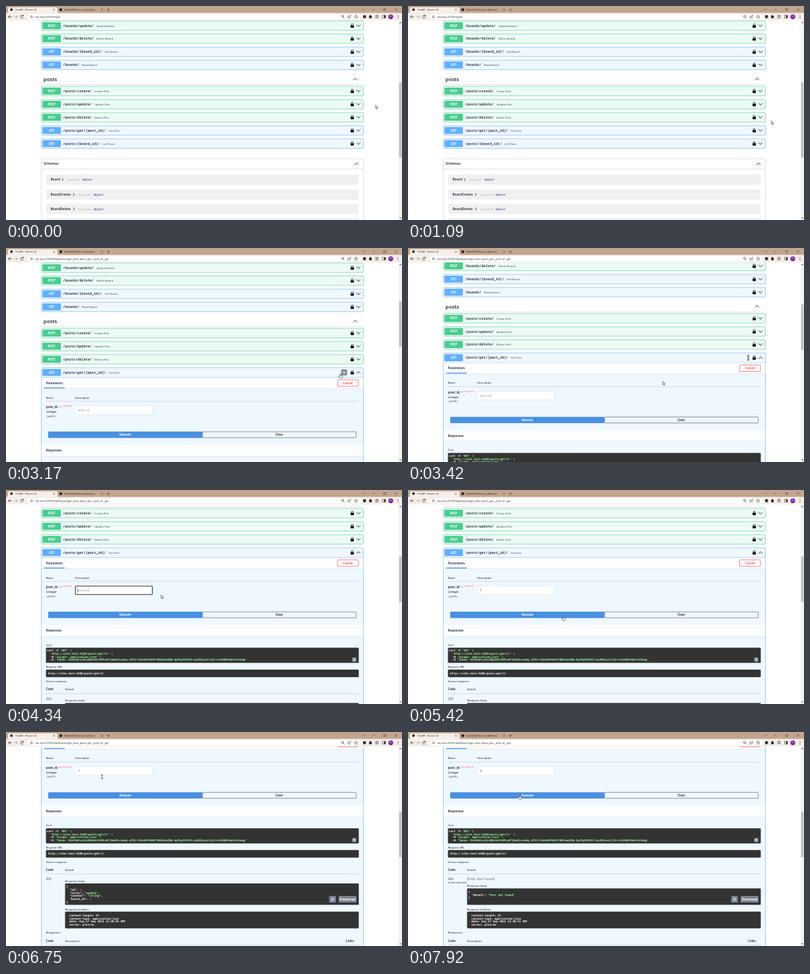
Write an HTML page that moves like this. It is 600 by 325 pixels and loops after 8 s.

```html
<!DOCTYPE html>
<html lang="en">
<head>
<meta charset="utf-8">
<title>API docs</title>
<style>
html, body { margin: 0; width: 100%; height: 100%; overflow: hidden; background: #fff; }
svg { display: block; width: 100vw; height: 100vh; }
text { font-family: "Open Sans", "Noto Sans", sans-serif; fill: #3b4151; white-space: pre; }
.b { font-weight: 700; }
.s { font-weight: 600; }
.path { font-family: "Noto Sans Mono", monospace; font-weight: 600; }
.code { font-family: "DejaVu Sans Mono", monospace; font-weight: 700; }
.line { fill: none; stroke-linecap: round; stroke-linejoin: round; }
</style>
</head>
<body>
<svg id="stage" viewBox="0 0 600 325"></svg>
<script>
const LOOP = 8000;
const GREEN = '#49cc90', BLUE = '#61affe', INK = '#3b4151', DARK = '#333', SLATE = '#7d8293';
const HOST = 'site.test:4100';

// Drawing helpers; text is placed by its vertical centre
const text = (x, cy, size, str, attrs = '') =>
  `<text x="${x}" y="${cy + size * 0.35}" font-size="${size}" ${attrs}>${str}</text>`;
const rect = (x, y, w, h, fill, attrs = '') =>
  `<rect x="${x}" y="${y}" width="${w}" height="${h}" fill="${fill}" ${attrs}/>`;
const path = (d, stroke = INK, w = 0.8, attrs = '') =>
  `<path class="line" d="${d}" stroke="${stroke}" stroke-width="${w}" ${attrs}/>`;
const rule = (x, y, w) => rect(x, y, w, 0.4, INK, 'opacity=".35"');
const group = (id, body) => `<g id="${id}">${body}</g>`;
const tint = (str, color) => `<tspan fill="${color}">${str}</tspan>`;
const str = s => tint(s, '#a2fca2');
const num = s => tint(s, '#d36363');
const mid = 'text-anchor="middle"';

const chevron = (x, y, up) => {
  const d = up ? -1.4 : 1.4;
  return path(`M${x - 2.7} ${y - d}L${x} ${y + d}L${x + 2.7} ${y - d}`, '#222', 0.9);
};
const lock = (x, y) =>
  rect(x - 2.5, y - 0.7, 5, 3.7, '#111', 'rx=".6"') +
  path(`M${x - 1.5} ${y - 0.5}v-1a1.5 1.5 0 0 1 3 0v1`, '#111', 0.8);
const copyIcon = (x, y, w, h) =>
  rect(x - w / 2, y - h / 2, w, h, SLATE, 'rx="1.2"') +
  rect(x - 1.5, y - 1.6, 3, 3.5, 'none', 'stroke="#fff" stroke-width=".55"') +
  path(`M${x - 0.7} ${y - 0.4}h1.4M${x - 0.7} ${y + 0.7}h1.4`, '#fff', 0.4);

const summary = (cy, method, url, label) => {
  const color = method === 'GET' ? BLUE : GREEN;
  return rect(55.2, cy - 5.3, 28, 10.6, color, 'rx="1.1"') +
    text(69.2, cy, 4.5, method, `class="b" style="fill:#fff" ${mid}`) +
    text(86.3, cy, 5.2, url, 'class="path"') +
    text(90.1 + url.length * 3.12, cy + 0.4, 4.2, label) + lock(524.6, cy);
};
const frame = (y, h, color) =>
  rect(53.5, y, 488, h, color, `fill-opacity=".1" stroke="${color}" stroke-width=".6" rx="1.4"`);
const row = (cy, method, url, label) =>
  frame(cy - 7.2, 14.4, method === 'GET' ? BLUE : GREEN) +
  summary(cy, method, url, label) + chevron(534, cy);

const codeLines = (x, y, lines) =>
  lines.map((s, i) => text(x, y + i * 4.68, 4.17, s, 'class="code" style="fill:#fff"')).join('');
const darkBox = (x, y, h) => rect(x, y, 534.5 - x, h, DARK, 'rx="1.4"');

function makeToken(n) {
  const set = 'ABCDEFGHIJKLMNOPQRSTUVWXYZabcdefghijklmnopqrstuvwxyz0123456789';
  let seed = 77, out = '';
  while (out.length < n) {
    seed = (seed * 16807) % 2147483647;
    out += out.length === 36 || out.length === 63 ? '.' : set[seed % set.length];
  }
  return out;
}
const token = makeToken(107);

function request(id) {
  const url = `http://${HOST}/posts/get/${id}/`;
  return codeLines(62, 338, [
    `curl -X ${str("'GET'")} \\`,
    `  ${str(`'${url}'`)} \\`,
    `  -H ${str("'accept: application/json'")} \\`,
    `  -H ${str(`'Token: ${token}'`)}`
  ]) + codeLines(64, 372.3, [url]);
}

function response(ok) {
  const top = ok ? 417.5 : 425;
  const body = ok
    ? ['{', `  "id": ${num('1')},`, `  "title": ${str('"update"')},`,
       `  "content": ${str('"string"')},`, `  "board_id": ${num('1')}`, '}']
    : ['{', `  "detail": ${str('"Post not found"')}`, '}'];
  const extra = ok ? '' :
    text(89.5, 411, 5.3, 'Error: Not Found', 'opacity=".8"') +
    text(60.5, 416.5, 3.9, 'Undocumented', 'class="path" font-style="italic" style="font-weight:400"');
  return extra + text(60.5, 411, 4.8, ok ? '200' : '404') +
    text(89.5, top - 4, 4.1, 'Response body', 'class="s"') +
    darkBox(89.5, top, 450 - top) + codeLines(91.5, top + 4.9, body) +
    copyIcon(494.8, 441.5, 10.2, 10) +
    rect(504, 436.5, 27, 10, SLATE, 'rx="1.2"') +
    text(517.5, 441.5, 4.7, 'Download', `class="b" style="fill:#fff" ${mid}`) +
    codeLines(93.5, 465.8, [
      ` content-length: ${ok ? 57 : 27}`, ' content-type: application/json',
      ` date: Sun,17 Sep 2023 12:36:${ok ? 49 : 51} GMT`, ' server: plovrun']);
}

function model(cy, name, x) {
  return rect(61, cy - 7.6, 473, 15.3, '#f0f0f0', 'rx="1.2"') +
    text(67.5, cy, 4.9, name, 'class="b"') +
    path(`M${x - 0.9} ${cy - 1.6}l1.7 1.7l-1.7 1.7`, '#222', 0.9) +
    text(x + 7, cy + 0.3, 3.8, 'Expand all', 'style="fill:#aaa"') +
    text(x + 29.5, cy + 0.3, 4.2, 'object', 'class="code" style="fill:#6b4a9e"');
}

const closed =
  row(189, 'GET', '/posts/get/{post_id}/', 'Get Post') +
  row(209, 'GET', '/posts/{board_id}/', 'List Posts') +
  rect(53.5, 232, 488, 140, 'none', `stroke="${INK}" stroke-opacity=".35" stroke-width=".5" rx="1.4"`) +
  text(57, 239.5, 5.2, 'Schemas', 'class="b"') + chevron(531, 239.5, true) + rule(53.5, 247, 488) +
  model(263.5, 'Board', 86) + model(286.3, 'BoardCreate', 103) +
  model(308, 'BoardDelete', 103) + model(329.7, 'BoardUpdate', 103);

const opened =
  frame(181.8, 420, BLUE) + summary(189, 'GET', '/posts/get/{post_id}/', 'Get Post') +
  chevron(534, 189, true) + rect(53.5, 196.3, 488, 0.5, BLUE) +
  rect(53.8, 196.8, 487.4, 16.4, '#fff', 'opacity=".8"') +
  rect(53.8, 213.2, 487.4, 0.5, '#000', 'opacity=".12"') +
  text(60.5, 205.2, 4.4, 'Parameters', 'class="b"') + rect(58, 211.8, 31, 1.3, '#4990e2') +
  rect(502.4, 200, 31.6, 10, 'none', 'rx="1.2" stroke="#ff6060" stroke-width=".8"') +
  text(518.2, 205, 4.4, 'Cancel', `class="b" style="fill:#ff6060" ${mid}`) +
  text(60.5, 227.3, 3.9, 'Name', 'class="s"') + text(105, 227.3, 3.9, 'Description', 'class="s"') +
  rule(60.5, 232.7, 474) +
  text(60.5, 241.5, 5, 'post_id', 'class="b"') +
  text(81, 242, 5, '*', 'style="fill:#f33"') + text(85.5, 240.3, 3.3, 'required', 'style="fill:#f55"') +
  text(60.8, 248.9, 3.9, 'integer', 'class="code"') +
  text(60.8, 255.3, 4.1, '(path)', 'class="path" font-style="italic" style="font-weight:400"') +
  rect(105.2, 240, 116.6, 12.8, '#fff', 'id="field" rx="1.2"') +
  text(109, 246.6, 5.1, '', 'id="value"') + rect(108.5, 243.5, 0.5, 6.2, '#111', 'id="caret"') +
  rect(64, 278.8, 233.6, 9.6, '#4990e2', 'rx="1"') +
  rect(297.9, 279.1, 232.8, 9, 'none', 'stroke="#666" stroke-width=".7" rx="1"') +
  text(180.8, 283.6, 4.5, 'Execute', `class="b" style="fill:#fff" ${mid}`) +
  text(414, 283.6, 4.5, 'Clear', `class="b" ${mid}`) +
  rect(53.8, 299, 487.4, 17, '#fff', 'opacity=".8"') +
  rect(53.8, 316, 487.4, 0.5, '#000', 'opacity=".12"') +
  text(60.5, 307.4, 4.5, 'Responses', 'class="b"') +
  text(60.5, 329.3, 4.1, 'Curl', 'class="s"') + darkBox(60.5, 333.6, 23) +
  copyIcon(527.6, 351.5, 6.2, 6.4) +
  text(60.5, 362.8, 4.1, 'Request URL', 'class="s"') + darkBox(60.5, 366.7, 11.5) +
  [5, 1, 2].map(id => group('req' + id, request(id))).join('') +
  text(60.5, 384.6, 4.1, 'Server response', 'class="s"') +
  text(60.5, 396.6, 4.6, 'Code', 'class="b"') + text(89.5, 396.6, 4, 'Details', 'class="s"') +
  rule(60.5, 403, 474) +
  text(89.5, 456.5, 4.1, 'Response headers', 'class="s"') + darkBox(89.5, 460.2, 25.4) +
  group('good', response(true)) + group('bad', response(false)) +
  text(60.5, 492, 4.3, 'Responses', 'class="s"') +
  text(60.5, 504.6, 4.6, 'Code', 'class="b"') + text(89.5, 504.6, 4, 'Description', 'class="s"') +
  text(515, 504.6, 4.5, 'Links', 'class="b"') + rule(60.5, 510.5, 474);

const page =
  row(30, 'POST', '/boards/update/', 'Update Board') +
  row(49.6, 'POST', '/boards/delete/', 'Delete Board') +
  row(69.6, 'GET', '/boards/{board_id}/', 'Get Board') +
  row(89.5, 'GET', '/boards/', 'Read Board') +
  text(56.8, 111.2, 7.7, 'posts', 'class="b"') + chevron(529, 111, true) + rule(53.5, 119.3, 488) +
  row(129.2, 'POST', '/posts/create/', 'Create Post') +
  row(149.2, 'POST', '/posts/update/', 'Update Post') +
  row(169, 'POST', '/posts/delete/', 'Delete Post') +
  group('closed', closed) + group('opened', opened) +
  group('copy', copyIcon(0, 189, 8.8, 9));

const icon = (d, w = 0.7) => path(d, '#2a2a2a', w);
const chrome =
  rect(0, 0, 600, 11, '#c1a58f') + rect(0, 10.5, 600, 11.5, '#f6eee8') +
  '<path d="M1 11q2 0 2-2V4q0-2 2-2h71q2 0 2 2v5q0 2 2 2z" fill="#f6eee8"/>' +
  '<circle cx="8.3" cy="5.6" r="2" fill="#222"/><circle cx="83" cy="5.6" r="2.2" fill="#222"/>' +
  text(14, 5.6, 3.6, 'TirnAPI - Plovern UI', 'style="fill:#222"') +
  '<clipPath id="tab"><path d="M88 0h50v11h-50z"/></clipPath>' +
  text(88, 5.6, 3.6, 'NoraVell4/Exercise_Archives', 'clip-path="url(#tab)" style="fill:#222"') +
  icon('M71.3 4.4l2.4 2.4m0-2.4l-2.4 2.4M144.3 4.4l2.4 2.4m0-2.4l-2.4 2.4M153.4 5.6h3.6m-1.8-1.8v3.6', 0.5) +
  icon('M540 4.6l1.5 1.5l1.5-1.5M555.5 5.4h3M572.6 4h2.8v2.8h-2.8zM589.6 4l2.8 2.8m0-2.8l-2.8 2.8', 0.5) +
  rect(33, 12.2, 505, 8.2, '#fff', 'rx="4.1"') +
  icon('M8.4 16.3h-4.6m2-2l-2 2l2 2') +
  path('M12.8 16.3h4.6m-2-2l2 2l-2 2', '#a59b95', 0.7) +
  icon('M26 15a2.2 2.2 0 1 0 .2 2.4M26.3 13.7v1.6h-1.6') +
  icon('M40.2 16.3a1.7 1.7 0 1 0-3.4 0a1.7 1.7 0 1 0 3.4 0M38.5 16.2v.9', 0.45) +
  text(44, 16.3, 4, '', 'id="url" style="fill:#222"') +
  icon('M511.6 15.7a1.6 1.6 0 1 0-3.2 0a1.6 1.6 0 1 0 3.2 0M511.2 17l1.5 1.5', 0.6) +
  icon('M519.2 15.2h-1.4v3h4v-1.4M519.6 16.8q.2-2 2.6-2.2m-1-1.1l1.1 1.1l-1.1 1.1', 0.5) +
  icon('M530.5 13.8l.8 1.7l1.8.2l-1.3 1.2l.3 1.8l-1.6-.9l-1.6.9l.3-1.8l-1.3-1.2l1.8-.2z', 0.5) +
  rect(541, 14, 4.4, 4.6, '#333', 'rx="1"') +
  rect(550.2, 15, 4, 3.6, '#222', 'rx=".5"') + '<circle cx="552" cy="14.6" r="1" fill="#222"/>' +
  icon('M560 14.4h4M560 16.2h2.4M560 18h2.4M564 15.8v2.2') +
  icon('M571 14.2h4v4h-4z', 0.6) + rect(573, 14.2, 2, 4, '#222') +
  '<circle cx="583" cy="16.3" r="3.6" fill="#7b1fa2"/>' +
  text(583, 16.3, 3, 'HS', `style="fill:#fff" ${mid}`) +
  [14.3, 16.3, 18.3].map(y => `<circle cx="594" cy="${y}" r=".55" fill="#222"/>`).join('');

const bar = rect(595, 22, 5, 303, '#f1f1f1') + rect(595.6, 116, 3.8, 114, '#c1c1c1', 'id="thumb"') +
  '<path d="M596 26l1.5-1.9l1.5 1.9zM596 321l1.5 1.9l1.5-1.9z" fill="#555"/>';

const outline = 'fill="#fff" stroke="#111" stroke-width=".5" stroke-linejoin="round"';
const pointers =
  `<path id="arrow" d="M0 0v5.2l1.2-1.1l.8 1.8l.9-.4l-.8-1.7h1.6z" ${outline}/>` +
  `<path id="hand" d="M-.6 .5q.6-.9 1.2 0v2.3l2 .5q.8.3.6 1.2l-.5 2.2h-3.4l-2-2.6q-.1-.9.8-.6l1.3.9z" ${outline}/>` +
  path('M-1.1-2.8q1.1 0 1.1.6q0-.6 1.1-.6M0-2.2v4.4M-1.1 2.8q1.1 0 1.1-.6q0 .6 1.1.6', '#111', 0.6, 'id="beam"');

const stage = document.getElementById('stage');
stage.innerHTML = rect(0, 0, 600, 325, '#fff') + group('page', page) + bar + chrome + group('cursor', pointers);
const el = {};
stage.querySelectorAll('[id]').forEach(n => el[n.id] = n);

// [time, x, y]
const moves = [
  [90, 560, 150.5], [840, 556, 163], [1400, 543, 189.3], [2340, 543, 189.3], [2500, 532.5, 188.5],
  [3080, 532.5, 188.5], [3420, 386, 202.3], [3740, 330, 185], [4150, 205, 153], [4210, 205, 153],
  [4340, 235, 159.3], [4800, 235, 159.3], [5060, 235.5, 191.5], [6260, 235.5, 191.5],
  [6700, 145.5, 68], [7350, 145.5, 68], [7700, 169, 95.3]
];
const scrolls = [[3340, 0], [3420, 22], [3580, 82], [3670, 94],
  [5750, 94], [5840, 121], [6010, 178], [6170, 187.4]];
const shapes = [[0, 'arrow'], [1300, 'hand'], [3200, 'arrow'], [4080, 'beam'], [4290, 'arrow'],
  [4980, 'hand'], [6330, 'arrow'], [6620, 'beam'], [7480, 'arrow'], [7640, 'hand']];

const OPEN = 2920, FOCUS1 = 4200, TYPE1 = 4750, RUN1 = 5170;
const FOCUS2 = 6850, TYPE2 = 7250, RUN2 = 7800, REPLY2 = 7900;

const clamp = v => Math.max(0, Math.min(1, v));
const smooth = k => k * k * (3 - 2 * k);
function sample(keys, t, ease = k => k) {
  let i = keys.findIndex(k => k[0] > t);
  if (i === 0) return keys[0].slice(1);
  if (i < 0) return keys[keys.length - 1].slice(1);
  const a = keys[i - 1], b = keys[i], k = ease((t - a[0]) / (b[0] - a[0]));
  return a.slice(1).map((v, j) => v + (b[j + 1] - v) * k);
}
const show = (node, on) => node.setAttribute('display', on ? 'inline' : 'none');

function draw(t) {
  const open = t >= OPEN;
  const [s] = sample(scrolls, t);
  el.page.setAttribute('transform', `translate(0 ${-s})`);
  show(el.closed, !open);
  show(el.opened, open);
  el.thumb.setAttribute('y', open ? 81 + 0.213 * s : 116);
  el.thumb.setAttribute('height', open ? 69 : 114);
  el.url.textContent = `${HOST}/help#/` + (open ? 'posts/get_post_posts_get__post_id__get' : '');

  const reveal = clamp((t - 1250) / 250) * clamp(1 - (t - 3250) / 260);
  show(el.copy, reveal > 0);
  el.copy.setAttribute('transform', `translate(${517 - 4.7 * reveal} 0) scale(${reveal} 1)`);

  const focusAt = t >= FOCUS1 && t < RUN1 ? FOCUS1 : t >= FOCUS2 && t < RUN2 ? FOCUS2 : -1;
  const focused = focusAt >= 0;
  const value = t < TYPE1 ? '' : t < TYPE2 ? '1' : '2';
  el.value.textContent = value || 'post_id';
  el.value.style.fill = value ? INK : '#999';
  el.field.setAttribute('stroke', focused ? '#332f26' : '#d9d9d9');
  el.field.setAttribute('stroke-width', focused ? 1.1 : 0.4);
  show(el.caret, focused && (t - focusAt) % 1000 < 500);
  el.caret.setAttribute('x', value ? 112.3 : 108.5);

  show(el.req5, t < RUN1);
  show(el.req1, t >= RUN1 && t < RUN2);
  show(el.req2, t >= RUN2);
  show(el.good, t < REPLY2);
  show(el.bad, t >= REPLY2);

  const [x, y] = sample(moves, t, smooth);
  el.cursor.setAttribute('transform', `translate(${x} ${y})`);
  const shape = shapes.filter(k => k[0] <= t).pop()[1];
  for (const name of ['arrow', 'hand', 'beam']) show(el[name], name === shape);
}

const start = performance.now();
function tick() {
  draw((performance.now() - start) % LOOP);
  requestAnimationFrame(tick);
}
tick();
</script>
</body>
</html>
```
